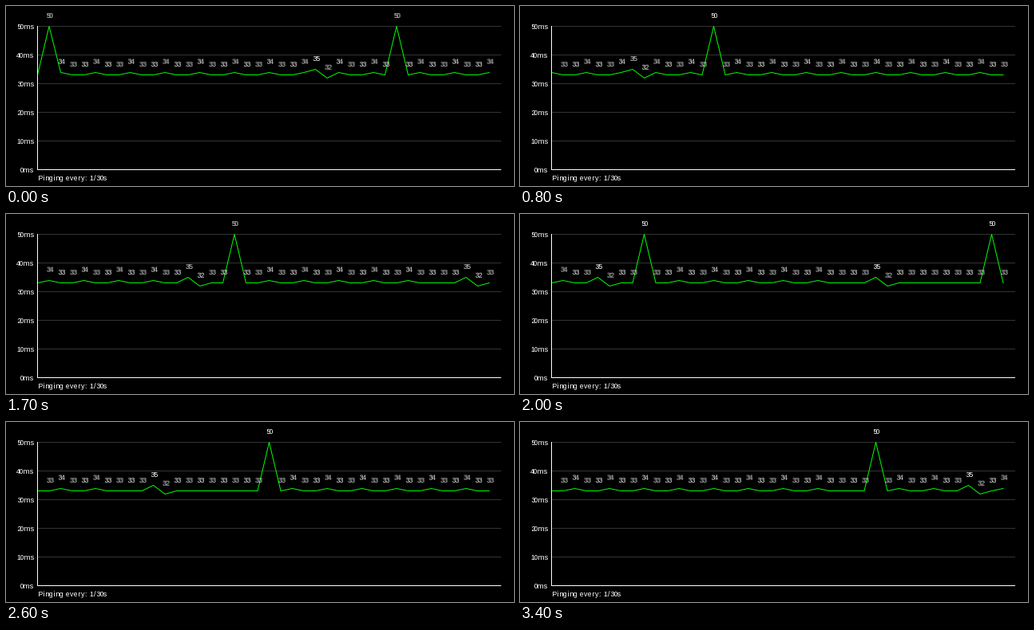
A matplotlib script that plays this animation: 636x226 px, repeating every 3.5 s.

```python
import numpy as np
import matplotlib.pyplot as plt
from matplotlib.animation import FuncAnimation

W, H, DPI = 636, 226, 72
FRAMES, INTERVAL = 35, 100
X0, Y0 = 39.5, 205.5          # graph corner in pixels
STEP, SCALE = 14.5, 3.6       # pixels per sample, pixels per ms
COUNT, TOTAL = 40, 134

plt.rcParams.update({
    "font.family": "Liberation Sans",
    "font.size": 9.33,
    "text.hinting": "force_autohint",
    "text.hinting_factor": 1,
})


def make_pings():
    """Steady 33 ms, 34 at every third sample, regular spikes, a few wobbles."""
    pings = np.full(TOTAL, 33)
    for spike, first, last in [(1, 2, 29), (31, 33, 54), (61, 64, 76),
                               (91, 93, 117), (122, 124, 133)]:
        pings[spike] = 50
        pings[first:last + 1:3] = 34
    for dip in (25, 58, 82, 131):
        pings[dip - 1:dip + 1] = 35, 32
    return pings


def to_y(ms):
    return Y0 - SCALE * ms


def first_sample(k):
    """Index of the leftmost visible sample; the scroll rate varies a little."""
    pos = np.interp(k, [0, 8, 26, 30, 34], [0, 17, 71, 82, 94])
    return int(pos + 0.5)


pings = make_pings()
fig = plt.figure(figsize=(W / DPI, H / DPI), dpi=DPI, facecolor="black")
ax = fig.add_axes([0, 0, 1, 1])
ax.set(xlim=(0, W), ylim=(H, 0))
ax.axis("off")


def line(x, y, color, zorder):
    return ax.plot(x, y, color=color, lw=1, snap=False, zorder=zorder)[0]


right = X0 + COUNT * STEP
for ms in range(0, 51, 10):
    y = to_y(ms)
    if ms:
        line([X0, right], [y, y], "#333333", 1)
    ax.text(35, y + 3.5, f"{ms}ms", color="white", ha="right", va="baseline")
line([X0, X0, right], [to_y(50), Y0, Y0], "white", 3)
ax.text(40, 219, "Pinging every: 1/30s", color="white", va="baseline")

xs = X0 + STEP * np.arange(COUNT)
graph = line(xs, xs, "#00ff00", 2)

# Four copies per label blend between neighbouring pixels
labels = [[ax.text(0, 0, "", color="white", va="baseline", zorder=4)
           for _ in range(4)] for _ in range(COUNT - 1)]


def place(copies, ms, x, y):
    left, top = np.floor([x + 1e-6, y + 1e-6])
    fx, fy = x - left, y - top
    for n, text in enumerate(copies):
        dx, dy = n % 2, n // 2
        weight = (fx if dx else 1 - fx) * (fy if dy else 1 - fy)
        text.set_visible(weight > 0.01)
        text.set_text(str(ms))
        text.set_position((left + dx, top + dy))
        text.set_alpha(min(1, max(0, weight)))


def update(k):
    start = first_sample(k)
    view = pings[start:start + COUNT]
    ys = to_y(view)
    graph.set_ydata(np.floor(ys) + 0.5)
    for copies, ms, x, y in zip(labels, view[1:], xs[1:], ys[1:]):
        place(copies, ms, x - 4.5, y - 10.5)
    return [graph]


anim = FuncAnimation(fig, update, frames=FRAMES, interval=INTERVAL,
                     repeat=True, repeat_delay=0, blit=False)
plt.show()
```
